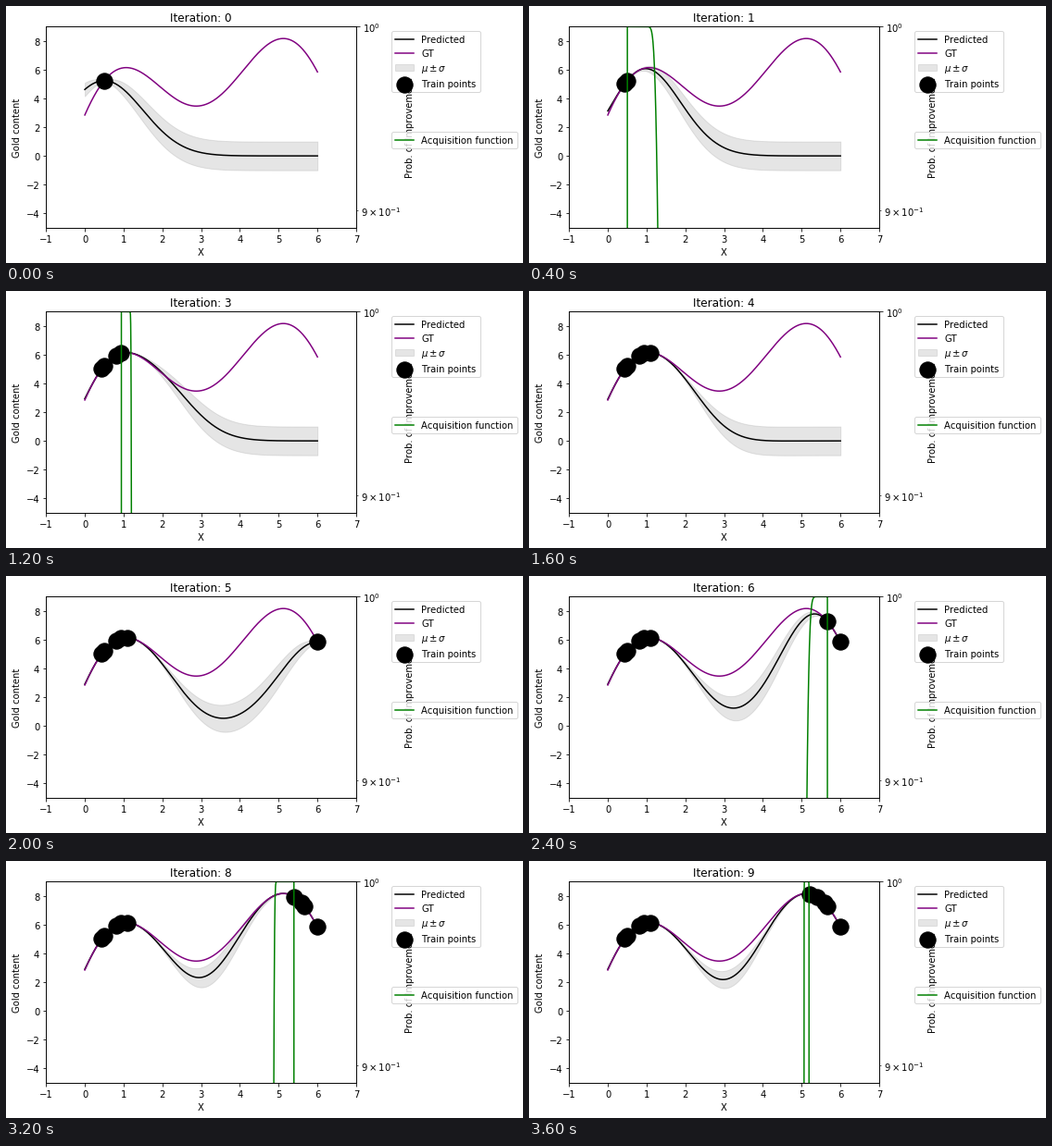
These frames come from a looping animation (558x278 px, 4000 ms). A matplotlib script:

```python
import math

import numpy as np
import matplotlib.pyplot as plt
from matplotlib.animation import FuncAnimation
from matplotlib.text import Text
from matplotlib.transforms import ScaledTranslation

W, H, DPI = 558, 278, 72
LEFT, TOP, AX_W, AX_H = 43.2, 22.36, 334.8, 217.44
TEXT_DROP = 0.84
EPS = 0.01

plt.rcParams.update({"font.family": "DejaVu Sans", "font.size": 10,
                     "text.kerning_factor": 6})


def truth(x):
    u = np.asarray(x) - 3
    return 2 * u * np.sin(u) + 0.5 * u + 3.5


grid = np.linspace(0, 6, 1000)
samples = np.array([0.5, 0.438, 0.8, 0.925, 1.1, 6.0, 5.67, 5.585, 5.4, 5.211])


def kernel(a, b):
    return np.exp(-0.5 * (a[:, None] - b[None, :]) ** 2)


def posterior(xs):
    """Mean and deviation of a unit RBF Gaussian process."""
    gram = kernel(xs, xs) + 1e-10 * np.eye(len(xs))
    cross = kernel(xs, grid)
    mean = cross.T @ np.linalg.solve(gram, truth(xs))
    var = 1 - np.sum(cross * np.linalg.solve(gram, cross), axis=0)
    return mean, np.sqrt(np.maximum(var, 1e-12))


def improvement(mean, dev, best):
    z = (mean - best - EPS) / dev
    cdf = [0.5 * (1 + math.erf(v / math.sqrt(2))) for v in z]
    return np.maximum(cdf, 1e-6)


def band(mean, dev):
    upper = np.column_stack([grid, mean + dev])
    lower = np.column_stack([grid, mean - dev])
    return np.vstack([lower, upper[::-1]])


fig = plt.figure(figsize=(W / DPI, H / DPI + 1e-6), dpi=DPI, facecolor="white")
ax = fig.add_axes([LEFT / W, 1 - (TOP + AX_H) / H, AX_W / W, AX_H / H])
ax.set(xlim=(-1, 7), ylim=(-5, 9), xlabel="X", ylabel="Gold content")
title = ax.set_title("Iteration: 0")

predicted, = ax.plot(grid, 0 * grid, color="black", label="Predicted")
ax.plot(grid, truth(grid), color="purple", label="GT")
spread = ax.fill_between(grid, -1, 1, color="gray", alpha=0.2,
                         label=r"$\mu \pm \sigma$")
dots = ax.scatter([0.5], [5.2], s=300, color="black", zorder=10,
                  label="Train points")
ax.legend(loc="upper left", bbox_to_anchor=(1.1, 1))

ax2 = ax.twinx()
ax2.set_yscale("log")
ax2.set_ylabel("Prob. of Improvement")
acquisition, = ax2.plot(grid, 0 * grid + 0.5, color="green",
                        label="Acquisition function")
ax2.set_yticks([1], [r"$\mathdefault{10^{0}}$"])
ax2.set_yticks([0.9], [r"$\mathdefault{9\times10^{-1}}$"], minor=True)
ax2.set_ylim(10 ** -0.05, 1)
ax2.legend(loc="upper left", bbox_to_anchor=(1.1, 0.5))


def drop_text():
    """Seat all lettering a fraction of a pixel lower than the lines."""
    fig.canvas.draw()
    shift = ScaledTranslation(0, -TEXT_DROP / DPI, fig.dpi_scale_trans)
    # The x label already follows its tick labels down.
    for text in set(fig.findobj(Text)) - {ax.xaxis.label}:
        text.set_transform(text.get_transform() + shift)


def update(i):
    xs = samples[:i + 1]
    ys = truth(xs)
    mean, dev = posterior(xs)
    title.set_text(f"Iteration: {i}")
    predicted.set_ydata(mean)
    spread.set_verts([band(mean, dev)])
    dots.set_offsets(np.column_stack([xs, ys]))
    acquisition.set_ydata(improvement(mean, dev, ys.max()))
    return title, predicted, spread, dots, acquisition


drop_text()
anim = FuncAnimation(fig, update, frames=len(samples), interval=400,
                     repeat=True, repeat_delay=0, blit=False)
plt.show()
```
